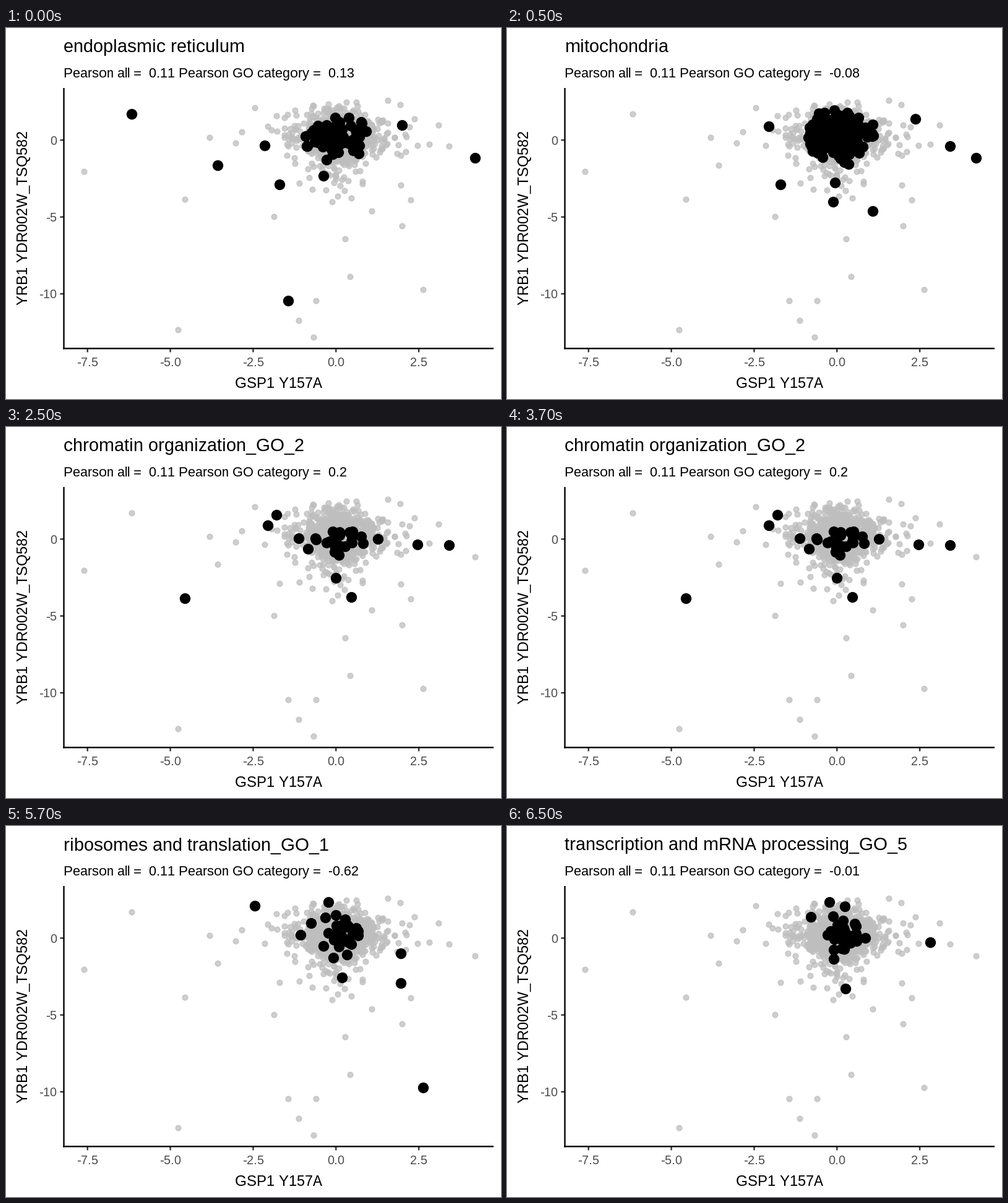
Write a matplotlib script that moves like this. It is 800 px wide and 600 px high and loops after 8 s.

```python
import numpy as np
import matplotlib.pyplot as plt
from matplotlib.animation import FuncAnimation

# Whole-pixel glyph advances without kerning
plt.rcParams.update({
    "font.family": "Liberation Sans",
    "text.hinting": "default",
    "text.hinting_factor": 1,
    "text.kerning_factor": 6,
})

PX = 0.72                       # points per pixel at 100 dpi
X0, X_STEP = 533.3, 133.85      # pixel of x = 0, pixels per 2.5 units
Y0, Y_STEP = 181.3, 124.3       # pixel of y = 0, pixels per 5 units
LEFT, RIGHT, TOP, BOTTOM = 93.5, 788, 97, 518.3
TICK = 6.1
INTERVAL, LOOP = 500, 8000
rng = np.random.default_rng(7)


def background_cloud(n):
    """Dense core with long tails to the sides and below."""
    x, y = rng.standard_t(3.5, size=(2, n)) * [[26], [17]] + [[535], [178]]
    keep = (x > 365) & (x < 700) & (y > 118) & (y < 305)
    return np.column_stack((x, y))[keep]


def category_cloud(n, center, spread):
    """Normally distributed points without the far tails."""
    p = rng.normal(size=(2 * n, 2))
    return p[np.hypot(*p.T) < 2.2][:n] * spread + center


# Points that stand apart from the clouds, in pixels
far_points = [
    (125, 231), (277, 487), (328, 176), (432, 304), (472, 472), (496, 499),
    (500, 440), (547, 340), (555, 401), (639, 319), (653, 277), (616, 116),
]

# Start in ms, title, correlation, cloud, points that stand apart
scenes = [
    (0, "endoplasmic reticulum", "0.13",
     category_cloud(85, (535, 178), (28, 17)),
     [(202, 138), (341, 221), (417, 189), (441, 252), (455, 440),
      (512, 238), (639, 156), (757, 209)]),
    (500, "mitochondria", "-0.08",
     category_cloud(130, (537, 178), (28, 22)),
     [(422, 158), (441, 252), (526, 280), (529, 249), (590, 295),
      (659, 146), (715, 190), (757, 209)]),
    (2500, "chromatin organization_GO_2", "0.2",
     category_cloud(26, (532, 183), (34, 13)),
     [(288, 276), (422, 158), (436, 141), (532, 243), (557, 274),
      (664, 189), (715, 190)]),
    (4500, "ribosomes and translation_GO_1", "-0.62",
     category_cloud(28, (540, 176), (27, 18)),
     [(401, 128), (475, 175), (520, 122), (542, 244), (637, 205),
      (637, 253), (673, 422)]),
    (6500, "transcription and mRNA processing_GO_5", "-0.01",
     category_cloud(27, (545, 180), (25, 17)),
     [(490, 146), (520, 122), (545, 129), (546, 262), (683, 187)]),
]
scenes = [(start, name, r, np.vstack((cloud, apart)))
          for start, name, r, cloud, apart in scenes]
everything = np.vstack([background_cloud(850), far_points,
                        *(points for *_, points in scenes)])
everything = np.unique(everything, axis=0)

fig = plt.figure(figsize=(8, 6), dpi=100, facecolor="white")
ax = fig.add_axes([0, 0, 1, 1])
ax.set(xlim=(0, 800), ylim=(600, 0))
ax.axis("off")


def text(x, y, string, size, **style):
    return ax.text(x, y, string, fontsize=size * PX, va="baseline", **style)


def line(xs, ys, color):
    ax.plot(xs, ys, color=color, lw=2.37 * PX, solid_capstyle="butt",
            snap=False)


def dots(points, radius, color, **style):
    return ax.plot(*(points + 0.5).T, "o", color=color, ms=2 * radius * PX,
                   mew=1.57 * PX, snap=False, **style)[0]


for k in range(-3, 2):
    x = X0 + k * X_STEP
    line([x, x], [BOTTOM, BOTTOM + TICK], "#333333")
    text(x, 547, f"{2.5 * k:.1f}", 19.56, color="#4d4d4d", ha="center")
for k in range(3):
    y = Y0 + k * Y_STEP
    line([LEFT - TICK, LEFT], [y, y], "#333333")
    text(82, y + 7.5, str(-5 * k), 19.56, color="#4d4d4d", ha="right")

dots(everything, 4.34, "#bebebe", alpha=0.75)
highlight = dots(scenes[0][3], 7.9, "black")
line([LEFT, LEFT], [TOP, BOTTOM + 1.2], "black")
line([LEFT - 1.2, RIGHT], [BOTTOM, BOTTOM], "black")

text(441, 582, "GSP1 Y157A", 24.44, ha="center")
text(35, 307, "YRB1 YDR002W_TSQ582", 24.44, ha="center", rotation=90,
     rotation_mode="anchor")
title = text(93, 39, "", 29.33)
subtitle = text(93, 80, "", 22)


def update(frame):
    now = frame * INTERVAL
    _, name, r, points = [s for s in scenes if s[0] <= now][-1]
    title.set_text(name)
    subtitle.set_text(f"Pearson all =  0.11 Pearson GO category =  {r}")
    highlight.set_data(*(points + 0.5).T)
    return title, subtitle, highlight


anim = FuncAnimation(fig, update, frames=LOOP // INTERVAL, interval=INTERVAL,
                     repeat=True, repeat_delay=0)
plt.show()
```
